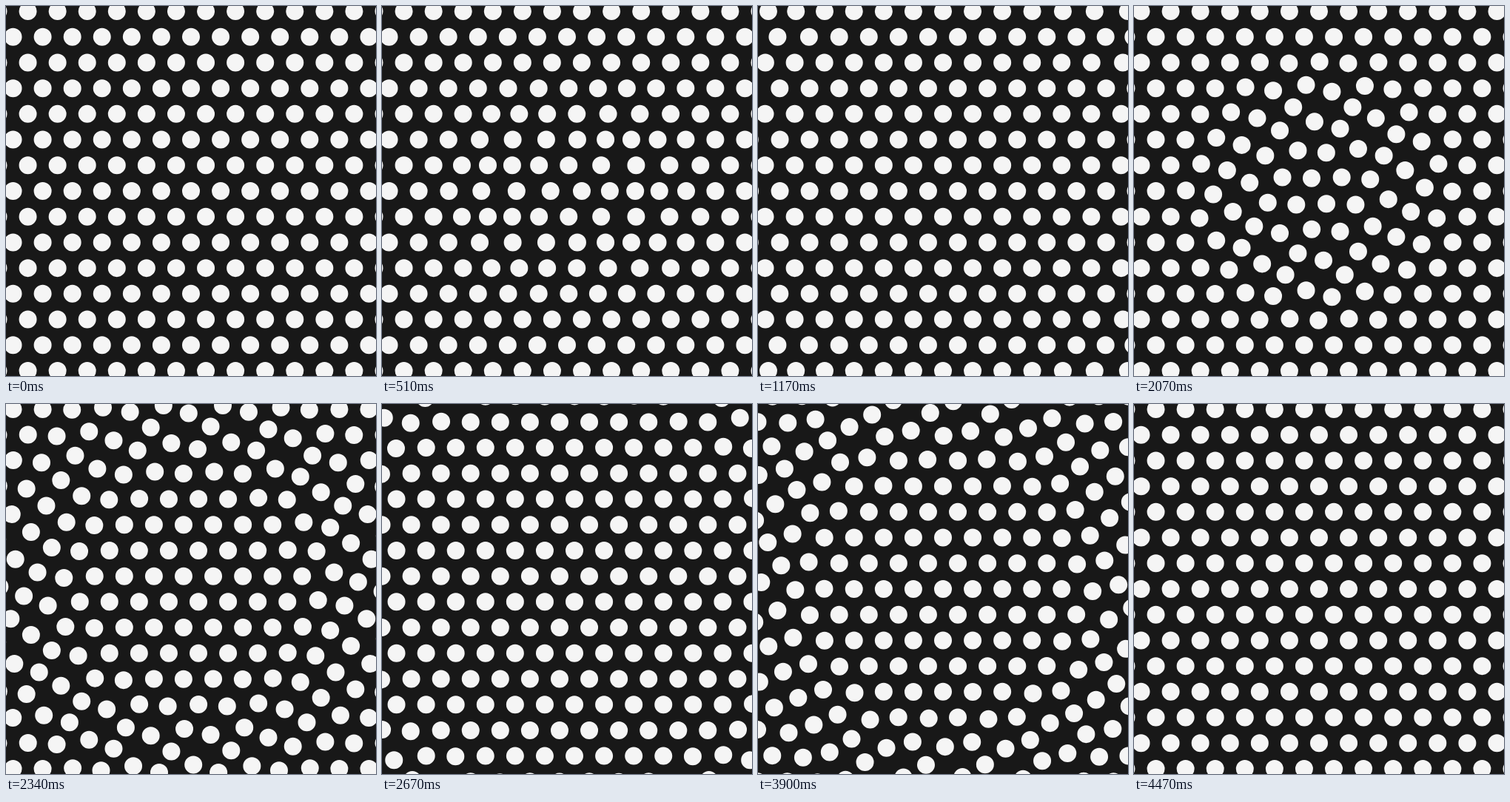
An HTML page with a canvas for the animation above (4500 ms loop, 500 by 500 pixels).

```html
<!DOCTYPE html>
<html lang="en">
<head>
<meta charset="utf-8">
<title>Sliding dots</title>
<style>
  html, body { margin: 0; width: 100%; height: 100%; overflow: hidden; background: #181818; }
  canvas { display: block; width: 500px; height: 500px; }
</style>
</head>
<body>
<canvas id="stage" width="500" height="500"></canvas>
<script>
const ctx = document.getElementById('stage').getContext('2d');

const SIZE = 500;
const SPACING = 40.08;
const ROW = SPACING * Math.sqrt(3) / 2;
const RADIUS = 12;
const REACH = 420;

const PHASE = 1500;        // ms per slide direction
const START = 45;          // ms before the centre moves
const DELAY = 2.45;        // ms of lag per pixel from the centre
const DURATION = 492;      // ms for one dot to slide
const POWER = 2.2;

// Each phase slides alternate lattice lines half a spacing in opposite directions.
const phases = [
  { angle: 0,            lineShift: 0,   dotShift: 0,    evenSign: 1 },
  { angle: -Math.PI / 3, lineShift: 0.5, dotShift: 0.25, evenSign: -1 },
  { angle: Math.PI / 3,  lineShift: 0,   dotShift: 0.5,  evenSign: 1 }
];

function ease(u) {
  if (u <= 0) return 0;
  if (u >= 1) return 1;
  return u < 0.5
    ? 0.5 * Math.pow(2 * u, POWER)
    : 1 - 0.5 * Math.pow(2 * (1 - u), POWER);
}

function drawDot(x, y) {
  ctx.moveTo(x + RADIUS, y);
  ctx.arc(x, y, RADIUS, 0, Math.PI * 2);
}

function draw(time) {
  const loopTime = time % (PHASE * phases.length);
  const { angle, lineShift, dotShift, evenSign } = phases[Math.floor(loopTime / PHASE)];
  const local = loopTime % PHASE;
  const cos = Math.cos(angle);
  const sin = Math.sin(angle);

  ctx.fillStyle = '#181818';
  ctx.fillRect(0, 0, SIZE, SIZE);
  ctx.fillStyle = '#f5f5f5';
  ctx.beginPath();

  for (let line = -13; line <= 13; line++) {
    const odd = Math.abs(line % 2);
    const sign = odd ? -evenSign : evenSign;
    const across = (line + lineShift) * ROW;
    for (let i = -12; i <= 12; i++) {
      const along = (i + dotShift + odd / 2) * SPACING;
      const distance = Math.hypot(along, across);
      if (distance > REACH) continue;
      const progress = ease((local - START - DELAY * distance) / DURATION);
      const moved = along + sign * progress * SPACING / 2;
      drawDot(SIZE / 2 + moved * cos - across * sin,
              SIZE / 2 + moved * sin + across * cos);
    }
  }
  ctx.fill();
}

function tick(now) {
  draw(now);
  requestAnimationFrame(tick);
}

draw(0);
requestAnimationFrame(tick);
</script>
</body>
</html>
```
